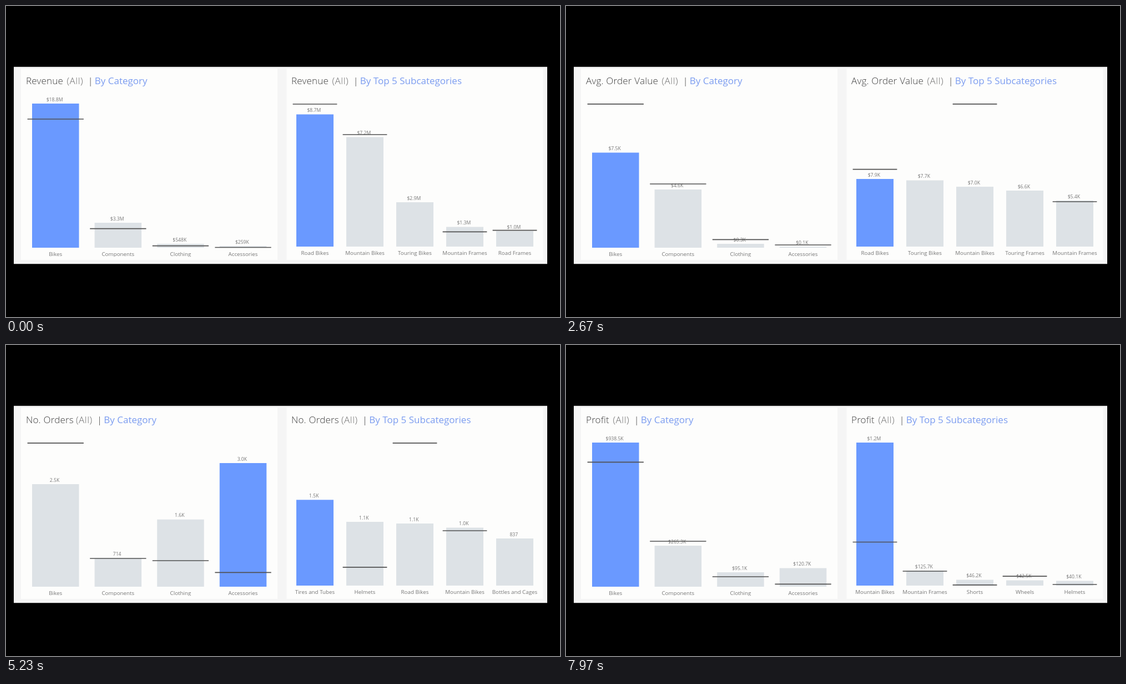
Write an HTML page that moves like this. It is 998 px wide and 561 px high and loops after 8 s.

```html
<!DOCTYPE html>
<html lang="en">
<head>
<meta charset="utf-8">
<title>Revenue dashboard</title>
<style>
html, body { margin: 0; width: 100%; height: 100%; overflow: hidden; background: #000; }
svg { display: block; width: 998px; height: 561px; font-family: "Open Sans", "Noto Sans", sans-serif; }
.title { font-size: 17px; font-weight: 300; letter-spacing: .2px; fill: #3c3c3c; }
.title .all { letter-spacing: .5px; fill: #707070; }
.title .by { font-weight: 400; letter-spacing: 0; fill: #7b9cf0; }
.axis { font-size: 9.8px; fill: #777; text-anchor: middle; }
.value { font-size: 8.6px; fill: #777; text-anchor: middle; }
.mark { stroke: #505050; stroke-width: 1.7; }
</style>
</head>
<body>
<svg viewBox="0 0 998 561">
  <clipPath id="cut"><path d="M0 0H998V452.3H0Z"/></clipPath>
  <path fill="#f5f5f5" d="M14 109.7H975V465.3H14Z"/>
  <path fill="#fdfdfc" d="M27 113H489V458H27ZM505.5 113H967.5V458H505.5Z"/>
  <g id="view" clip-path="url(#cut)"></g>
</svg>
<script>
const LOOP = 8000, DURATION = 1250;
const BLUE = [106, 153, 255], GREY = [221, 226, 230];
const PANELS = [
  { key: 'cat', title: 'By Category', x: 37, bar: 47, pitch: 112.6, w: 84.5, over: 8.4, base: 436, axis: 451 },
  { key: 'sub', title: 'By Top 5 Subcategories', x: 515, bar: 523, pitch: 90, w: 67, over: 6.4, base: 434, axis: 449 }
];

// Each bar: name, top of bar, reference line, value
const METRICS = [
  { name: 'Revenue', gap: 74, start: -LOOP,
    cat: [['Bikes', 176, 204, '$18.8M'], ['Components', 391, 401.6, '$3.3M'],
      ['Clothing', 429, 432.7, '$548K'], ['Accessories', 433, 435.5, '$259K']],
    sub: [['Road Bikes', 195.5, 177, '$8.7M'], ['Mountain Bikes', 236.5, 232, '$7.2M'],
      ['Touring Bikes', 354, null, '$2.9M'], ['Mountain Frames', 398.5, 407.3, '$1.3M'],
      ['Road Frames', 406, 404.7, '$1.0M']] },
  { name: 'Avg. Order Value', gap: 137, start: 545,
    cat: [['Bikes', 264.5, 176.8, '$7.5K'], ['Components', 331, 321, '$4.6K'],
      ['Clothing', 429, 421.3, '$0.3K'], ['Accessories', 434, 431, '$0.1K']],
    sub: [['Road Bikes', 312, 294.7, '$7.9K'], ['Touring Bikes', 314.5, null, '$7.7K'],
      ['Mountain Bikes', 326, 176.8, '$7.0K'], ['Touring Frames', 333, null, '$6.6K'],
      ['Mountain Frames', 351, 353, '$5.4K']] },
  { name: 'No. Orders', gap: 90.5, start: 2860,
    cat: [['Bikes', 251, 176.8, '2.5K'], ['Components', 384.5, 385, '714'],
      ['Clothing', 314.7, 389, '1.6K'], ['Accessories', 213, 410.3, '3.0K']],
    sub: [['Tires and Tubes', 279.3, null, '1.5K'], ['Helmets', 319, 400.8, '1.1K'],
      ['Road Bikes', 322, 176.8, '1.1K'], ['Mountain Bikes', 329.5, 335, '1.0K'],
      ['Bottles and Cages', 349, null, '837']] },
  { name: 'Profit', gap: 49, start: 6672,
    cat: [['Bikes', 176, 211.3, '$938.5K'], ['Components', 362, 354, '$265.3K'],
      ['Clothing', 410, 418, '$95.1K'], ['Accessories', 402.5, 431.3, '$120.7K']],
    sub: [['Mountain Bikes', 176, 355.5, '$1.2M'], ['Mountain Frames', 407, 408, '$125.7K'],
      ['Shorts', 423.5, 432.8, '$46.2K'], ['Wheels', 424.5, 417.2, '$42.5K'],
      ['Helmets', 425.5, 432, '$40.1K']] }
];

const view = document.getElementById('view');
const mix = (a, b, k) => a + (b - a) * k;
const ease = t => 1 - (1 - Math.min(1, t) ** .452) ** 2;
const text = (cls, x, y, s) => `<text class="${cls}" x="${x}" y="${y}">${s}</text>`;

function layout(metric, p) {
  const rows = metric[p.key], best = Math.min(...rows.map(r => r[1]));
  return rows.map(([name, top, line, value], i) => ({
    name, top, line, value, x: p.bar + i * p.pitch, color: top === best ? BLUE : GREY
  }));
}

function blend(a, b, k) {
  return { ...b, x: mix(a.x, b.x, k), top: mix(a.top, b.top, k),
    line: a.line === null || b.line === null ? b.line : mix(a.line, b.line, k),
    color: a.color.map((c, i) => mix(c, b.color[i], k)) };
}

function drawPanel(p, now, before, k) {
  const next = layout(now, p), old = before ? layout(before, p) : next;
  const twin = (list, d) => list.find(o => o.name === d.name);
  const leaving = k < 1 ? old.filter(d => !twin(next, d))
    .map(d => ({ ...d, value: '', line: d.line ?? p.base - 1, alpha: 1 - k })) : [];
  const entering = next.filter(d => !twin(old, d)).map(d => ({ ...d, alpha: k }));
  const moving = next.filter(d => twin(old, d)).map(d => ({ ...blend(twin(old, d), d, k), alpha: 1 }));
  const all = [...leaving, ...entering, ...moving];

  const bars = all.map(d => `<rect x="${d.x}" y="${d.top}" width="${p.w}" height="${p.base - d.top}"
    fill="rgb(${d.color.map(Math.round)})" opacity="${d.alpha}"/>`);
  const values = all.map(d => text('value', d.x + p.w / 2 - 1.7 * k, d.top - 4.3, d.value));
  const marks = all.filter(d => d.line !== null).map(d =>
    `<path class="mark" d="M${d.x - p.over} ${d.line}h${p.w + 2 * p.over}" opacity="${d.alpha}"/>`);
  const names = next.map(d => text('axis', d.x + p.w / 2, p.axis, d.name));

  const x = p.x + now.gap;
  const title = text('title', p.x - 1, 140.5, now.name +
    `<tspan class="all" x="${x - 1.5}">(All)</tspan><tspan x="${x + 36.5}">|</tspan>` +
    `<tspan class="by" x="${x + 48.8}">${p.title}</tspan>`);
  return [title, ...bars, ...values, ...marks, ...names].join('');
}

function frame(ms) {
  const t = ms % LOOP;
  const i = METRICS.findLastIndex(m => t >= m.start);
  const k = ease((t - METRICS[i].start) / DURATION);
  view.innerHTML = PANELS.map(p => drawPanel(p, METRICS[i], METRICS[i - 1], k)).join('');
}

const begin = performance.now();
function tick() {
  frame(performance.now() - begin);
  requestAnimationFrame(tick);
}
tick();
</script>
</body>
</html>
```
